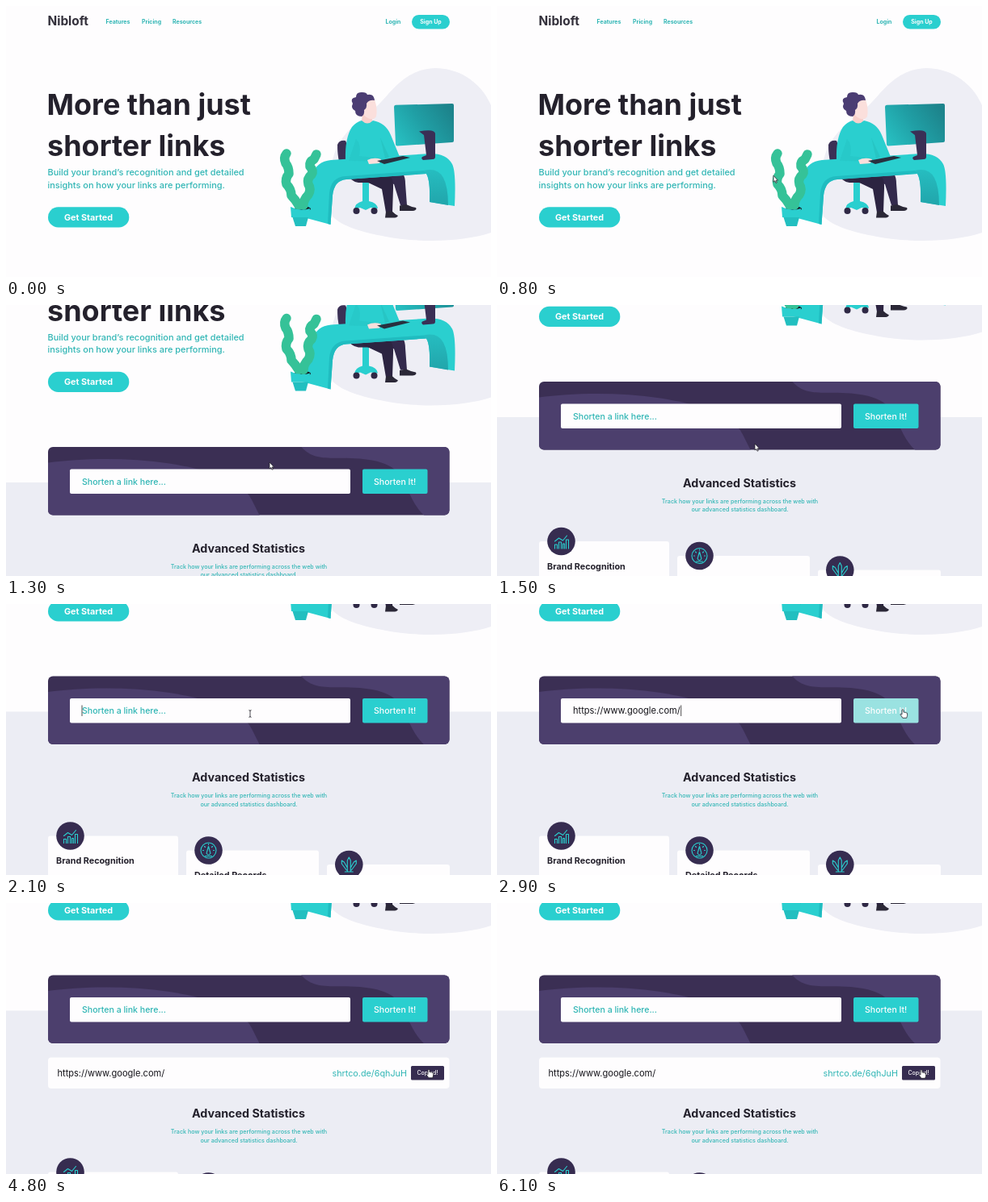
Animation of 600x336 px, one loop 6400 ms. Source, as an HTML page:

```html
<!DOCTYPE html>
<html lang="en">
<head>
<meta charset="utf-8">
<title>Link shortener</title>
<style>
  html, body { margin: 0; width: 100%; height: 100%; overflow: hidden; background: #fefdfe; }
  svg { display: block; width: 100vw; height: 100vh; }
  text { font-family: Inter, Roboto, "Open Sans", sans-serif; }
  .b { font-weight: 700; }
  .m { font-weight: 500; }
  .teal { fill: #2acfcf; }
  .tealText { fill: #31b6b5; }
  .ink { fill: #24212c; }
  .white { fill: #fefdfe; }
  .dark { fill: #362c50; }
  .mid { text-anchor: middle; }
  .icon { fill: none; stroke: #2acfcf; stroke-width: 1.1; stroke-linecap: round; stroke-linejoin: round; }
</style>
</head>
<body>
<svg viewBox="0 0 600 336">
  <defs>
    <linearGradient id="screen" x1="0" y1=".8" x2="1" y2=".3">
      <stop offset="0" stop-color="#27bfc1"/><stop offset=".5" stop-color="#209fa5"/><stop offset="1" stop-color="#1d848c"/>
    </linearGradient>
    <linearGradient id="inner" x1="0" y1="0" x2="0" y2="1">
      <stop offset="0" stop-color="#26bdc0"/><stop offset="1" stop-color="#21a5ab"/>
    </linearGradient>
    <clipPath id="panel"><rect x="52" y="342.5" width="496.5" height="84.5" rx="6"/></clipPath>
  </defs>
  <rect class="white" width="600" height="336"/>
  <g id="page">
    <rect y="386.5" width="600" height="500" fill="#ecedf4"/>

    <!-- navigation -->
    <text class="b" x="51.5" y="24" font-size="15.4" fill="#33303b">Nibloft</text>
    <g class="b tealText" font-size="7">
      <text x="123.5" y="22">Features</text>
      <text x="168" y="22">Pricing</text>
      <text x="206" y="22">Resources</text>
      <text x="469.5" y="22">Login</text>
    </g>
    <rect class="teal" x="502" y="11" width="47" height="17.5" rx="8.75"/>
    <text class="b white mid" x="525.5" y="22.3" font-size="7">Sign Up</text>

    <!-- hero copy -->
    <g class="b ink" font-size="36">
      <text x="50.5" y="135">More than just</text>
      <text x="51" y="186">shorter links</text>
    </g>
    <g class="m tealText" font-size="10.95">
      <text x="51.5" y="210.3">Build your brand’s recognition and get detailed</text>
      <text x="51.5" y="225.5">insights on how your links are performing.</text>
    </g>
    <rect class="teal" x="52" y="249.3" width="100.3" height="25.2" rx="12.6"/>
    <text class="b white mid" x="102" y="265.7" font-size="10.8">Get Started</text>

    <!-- hero picture -->
    <path fill="#eeeef5" d="M600 123C586 91 557 77 531 77C496 78 479 103 464 119C444 141 408 155 403 198C401 225 400 246 404 261C416 273 438 280 470 286C520 295 570 291 600 281Z"/>
    <path fill="#3b3055" d="M410 172Q412 166 420 167L430 190V206H418Q410 196 410 172Z"/>
    <path class="teal" d="M441 212H449V242Q459 244 460 251L451 250L445 253L438 250L431 252Q432 244 441 242Z"/>
    <g fill="#2f2845">
      <path d="M423 208H462Q466 217 456 219H436Q425 217 423 208Z"/>
      <circle cx="433.500" cy="254" r="4"/><circle cx="455.500" cy="254" r="4"/>
    </g>
    <path fill="#332a4c" d="M440 205L484 203Q494 206 494 220L496 247H488L480 221L470 217Z"/>
    <path fill="#2c2441" d="M438 207L468 206Q480 210 479 226L478 256H470L465 227L446 218Q437 214 438 207Z"/>
    <path fill="#2b2837" d="M470 255L477 254Q481 258 485 260Q484 263 477 262.500H469ZM487 247.500L495 246Q501 249 507 250Q509 253 503 254H487Z"/>
    <path fill="#f7cfca" d="M441 132H453V143Q448 150 440 144Z"/>
    <path fill="#fbdfdc" d="M440 117Q448 111 456 116Q460 128 458 137Q454 143 446 138Q439 134 440 117Z"/>
    <path fill="#4b3d73" d="M456 117Q449 116 446 121Q447 126 443 129Q444 134 440 137Q432 137 432 130Q426 127 429 121Q425 114 433 113Q433 106 441 107Q446 107 447 110Q455 108 456 117Z"/>
    <path class="teal" d="M357 259Q373 238 380 208Q384 193 402 191L525 183Q545 183 552 196Q557 206 555 248L524 243Q525 216 520 208L421 215Q406 216 404 235L401.500 271Z"/>
    <path fill="url(#inner)" d="M517 204Q534 200 541 213Q547 224 547 247L524 243Q525 216 520 208Z"/>
    <path fill="#20bcc0" d="M520 208L421 215Q406 216 404 235L401.500 271L398 270L400 232Q402 212 420 211L517 204Z"/>
    <path class="teal" d="M440 142Q447 149 454 142Q470 145 476 160L487 187L470 193L420 191Q419 164 428 150Q433 144 440 142Z"/>
    <path fill="#25c1c0" d="M433 165Q440 172 437 186L466 189L468 193L424 192Z" opacity=".45"/>
    <path fill="#27c5c4" d="M463 163L474 187L469 189Z"/>
    <path fill="#fbdfdc" d="M447 191Q455 187 464 190L462 195L449 196Z"/>
    <path fill="#28303f" d="M459 192L491 186L500 188L468 196Z"/>
    <path fill="url(#screen)" d="M480 125Q480 123 482 122.800L552 121Q554 121 554 123V167Q554 169 552 169L484 173.500Q482 173.500 482 171.500Z"/>
    <path fill="#3a2f55" d="M511 155.500Q530 152 531 158V187Q531 190 528 190L516 191Q513 189 515 187L520 185L517 160Z"/>
    <ellipse cx="367" cy="251.500" rx="10" ry="3.200" fill="#15181f"/>
    <path fill="none" stroke="#35c298" stroke-width="11.500" stroke-linecap="round" stroke-linejoin="round"
      d="M362 247Q358 240 353 235Q353 227 347 221Q345 214 350 208Q350 200 346 195Q343 188 347 183M368 247Q368 240 374 234Q378 227 374 221Q372 214 378 209Q381 204 376 199Q375 193 381 190L384 184"/>
    <path class="teal" d="M352 249Q364 255 376 251L375 262H353Z"/>
    <path fill="#22bfc0" d="M354.500 262H374L371 273H358Z"/>

    <!-- shortener -->
    <g clip-path="url(#panel)">
      <rect x="52" y="342" width="497" height="86" fill="#3b2f54"/>
      <path fill="#4c3f6d" d="M52 362C92 356.500 150 355 202 363C258 372 293 386 304 408L314 428H52Z"/>
      <path fill="#4c3f6d" d="M365 342C382 362 404 354 438 357C482 361 488 376 496 393Q506 418 518 428H549V342Z"/>
    </g>
    <rect class="white" x="79" y="370" width="347" height="30.500" rx="2"/>
    <text id="field" x="94" y="389"></text>
    <path id="caret" stroke="#222" stroke-width=".8"/>
    <rect id="send" x="441" y="370" width="80.500" height="30.500" rx="2"/>
    <text class="m white mid" x="481.200" y="389" font-size="10.5">Shorten It!</text>

    <g id="result">
      <rect class="white" x="52" y="444.500" width="496.500" height="38.500" rx="4"/>
      <text x="63.500" y="468" font-size="11.05" fill="#15141a">https://www.google.com/</text>
      <text class="tealText" x="496" y="468" font-size="10.8" text-anchor="end">shrtco.de/6qhJuH</text>
      <rect id="copy" x="501" y="455" width="41" height="17.500" rx="1.500"/>
      <text id="copyText" class="m white mid" x="521.500" y="466.200" font-size="7"></text>
    </g>

    <!-- statistics -->
    <g id="stats">
      <text class="b ink mid" x="300" y="473" font-size="14.3">Advanced Statistics</text>
      <g class="m tealText mid" font-size="7.15">
        <text x="300.500" y="493">Track how your links are performing across the web with</text>
        <text x="300.500" y="503.500">our advanced statistics dashboard.</text>
      </g>
      <g class="white">
        <rect x="52" y="540.500" width="161" height="140" rx="3"/>
        <rect x="223" y="558.500" width="164" height="140" rx="3"/>
        <rect x="397" y="576" width="152" height="140" rx="3"/>
      </g>
      <g class="dark">
        <circle cx="79.500" cy="540.500" r="17.300"/>
        <circle cx="250.500" cy="558.500" r="17.300"/>
        <circle cx="424.300" cy="576" r="17.300"/>
      </g>
      <g class="icon">
        <path transform="translate(79.500 540.500)" d="M-8 9V4H-5V9M-3 9V1H0V9M2 9V3H4V9M6 9V-2H9V9M-8 0L-3 -4L2 -1L7 -7"/>
        <g transform="translate(250.500 558.500)">
          <circle r="9.500"/><path d="M0 -5L2 2A2.300 2.300 0 1 1 -2 2ZM-7 0H-6M6 0H7M-5 -5L-4 -4M5 -5L4 -4M0 -8V-7M-4 7H4"/>
        </g>
        <path transform="translate(424.300 576)" d="M-2 9V-5L0 -9L2 -5V9ZM-3 7L-9 -1L-9 -5L-6 -3L-2 4M3 7L9 -1V-5L6 -3L2 4M-5 9H5"/>
      </g>
      <g class="b ink" font-size="10.8">
        <text x="62" y="575">Brand Recognition</text>
        <text x="233" y="592.500">Detailed Records</text>
      </g>
    </g>
  </g>

  <g id="cursor" stroke-linejoin="round">
    <path id="arrow" fill="#fff" stroke="#24222b" stroke-width=".8" d="M0 0V8L1.800 6.400L3 9.200L4.300 8.600L3.100 5.900H5.500Z"/>
    <path id="beam" fill="none" stroke="#24222b" stroke-width=".8" d="M-1.500 -4.500Q0 -4.500 0 -3V3Q0 4.500 -1.500 4.500M1.500 -4.500Q0 -4.500 0 -3M0 3Q0 4.500 1.500 4.500"/>
    <path id="hand" fill="#fff" stroke="#24222b" stroke-width=".8" d="M-1 5.500V.8Q0 -.5 1 .8V3.700Q2 3 2.700 4Q3.800 3.400 4.300 4.500Q5.600 4.200 5.600 5.600V8Q5.200 9.200 4.700 10.800H-.2Q-1.500 8.500 -3 6.700Q-3.200 5 -1 6.500Z"/>
  </g>
</svg>
<script>
const $ = id => document.getElementById(id);
const LOOP = 6400, STEP = 100;
const FOCUS = 1900, PASTE = 2200, SEND = 3000, RESULT = 3700, COPIED = 4600;
const url = "https://www.google.com/";

// [time, value...] keys, linear between neighbours
const scroll = [[800, 0], [900, 4], [1000, 20], [1100, 56], [1200, 112], [1300, 166.5],
  [1400, 213], [1500, 247.5], [1600, 251.5], [1700, 253]];
const pointer = [[300, 596, 328], [500, 440, 255], [700, 345, 212], [1100, 333, 205],
  [1300, 326, 195], [1500, 319, 172], [1800, 302, 136], [2300, 302, 136], [2500, 380, 134],
  [2700, 482, 132], [2900, 502, 130.5], [3900, 502, 130.5], [4100, 508, 152],
  [4300, 519, 195], [4500, 523, 206], [4800, 523, 206], [5100, 525, 206.5]];

function at(keys, t) {
  const i = keys.findIndex(k => k[0] > t);
  if (i < 0) return keys[keys.length - 1].slice(1);
  if (i === 0) return keys[0].slice(1);
  const a = keys[i - 1], b = keys[i], p = (t - a[0]) / (b[0] - a[0]);
  return a.slice(1).map((v, n) => v + (b[n + 1] - v) * p);
}

const show = (id, on) => $(id).setAttribute("display", on ? "inline" : "none");
const put = (id, attrs) => { for (const k in attrs) $(id).setAttribute(k, attrs[k]); };
const inside = (x, y, l, t, r, b) => x >= l && x <= r && y >= t && y <= b;

function draw(t) {
  const [top] = at(scroll, t);
  const [x, y] = at(pointer, t);
  const py = y + top;
  const done = t >= RESULT;
  const filled = t >= PASTE && !done;
  const copied = t >= COPIED;

  put("page", { transform: `translate(0 ${-top})` });
  put("stats", { transform: `translate(0 ${done ? 46 : 0})` });
  show("result", done);

  const field = $("field");
  field.textContent = filled ? url : "Shorten a link here...";
  put("field", filled
    ? { "font-size": 11.05, "font-weight": 400, fill: "#15141a" }
    : { "font-size": 10.55, "font-weight": 500, fill: "#31b6b5" });
  const end = filled ? 95 + field.getComputedTextLength() : 94;
  put("caret", { d: `M${end} 378.500V392` });
  show("caret", t >= FOCUS && t < SEND);

  const onSend = inside(x, py, 441, 370, 521.5, 400.5);
  const onCopy = done && inside(x, py, 501, 455, 542, 472.5);
  const onField = inside(x, py, 79, 370, 426, 400.5);
  put("send", { fill: onSend ? "#9ae2e1" : "#2acfcf" });
  put("copy", { fill: copied ? "#362c50" : onCopy ? "#9ae2e1" : "#2acfcf" });
  $("copyText").textContent = copied ? "Copied!" : "Copy";

  put("cursor", { transform: `translate(${x} ${y})` });
  show("cursor", t >= 300);
  show("hand", onSend || onCopy);
  show("beam", onField);
  show("arrow", !onSend && !onCopy && !onField);
}

function tick() {
  const t = performance.now() % LOOP;
  draw(Math.floor(t / STEP) * STEP);
  requestAnimationFrame(tick);
}
tick();
</script>
</body>
</html>
```
